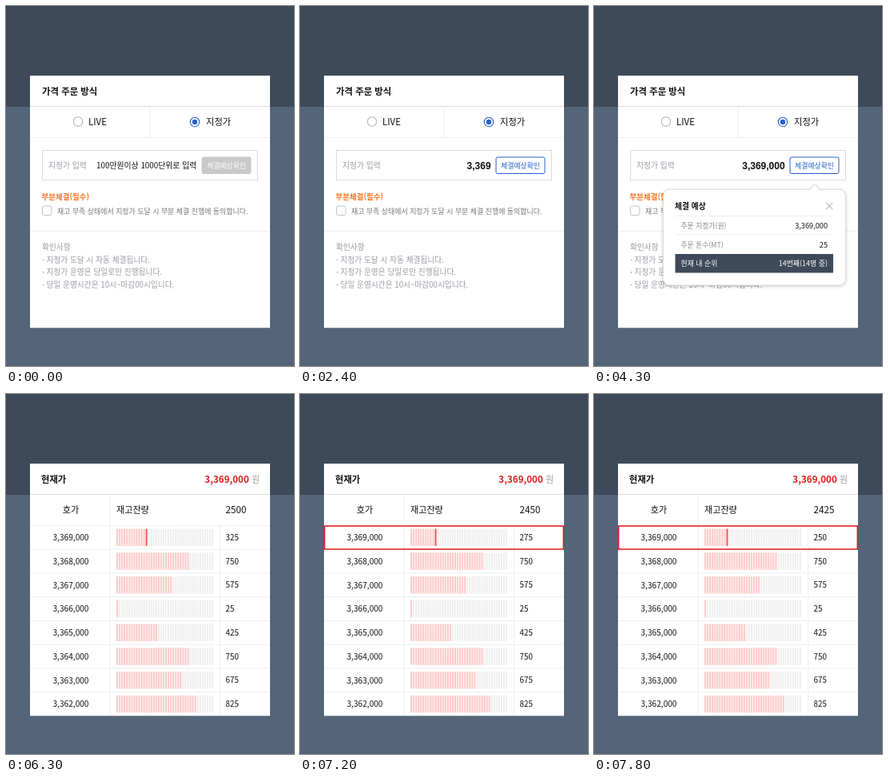
Write an HTML page that moves like this. It is 360 by 450 pixels and loops after 8 s.

```html
<!DOCTYPE html>
<html lang="ko">
<head>
<meta charset="utf-8">
<style>
  html, body { margin: 0; width: 100%; height: 100%; overflow: hidden; background: #546579; }
  svg { display: block; width: 100vw; height: 100vh; }
  text { font-family: "Noto Sans CJK KR", "Noto Sans CJK", sans-serif; white-space: pre; }
  .arial { font-family: "Liberation Sans", Arial, sans-serif; }
  .popup { filter: drop-shadow(0 1px 2px rgba(0, 0, 0, .22)); }
</style>
</head>
<body>
<svg id="stage" viewBox="0 0 360 450"></svg>
<script>
const LOOP = 8000, TYPE_START = 1500, TYPE_STEP = 300;
const POPUP_START = 4300, TABLE_START = 6300, BLINK = 300;
const NAVY = '#3e4a5a', BLUE = '#2460cc', RED = '#e01a1a', GRAY = '#9a9aa6', RULE = '#eeeeee';
const stage = document.getElementById('stage');

// Text is placed by the vertical centre of its glyphs.
function label(x, middle, string, size, { fill = '#111', weight = 400, anchor = 'start', cls = '' } = {}) {
  return `<text class="${cls}" x="${x}" y="${middle + size * 0.37}" font-size="${size}" fill="${fill}"
    font-weight="${weight}" text-anchor="${anchor}">${string}</text>`;
}
const rect = (x, y, w, h, fill, extra = '') =>
  `<rect x="${x}" y="${y}" width="${w}" height="${h}" fill="${fill}" ${extra}/>`;
const hLine = (y, x = 30, w = 300, color = RULE) => rect(x, y, w, 1, color);
const vLine = (x, y, h, color = RULE) => rect(x, y, 1, h, color);
const ring = (x, y, color) =>
  `<circle cx="${x}" cy="${y}" r="5.7" fill="#fff" stroke="${color}" stroke-width="1.1"/>`;

const card = rect(0, 0, 360, 450, '#546579') + rect(0, 0, 360, 126, NAVY) +
  rect(30, 87, 300, 315.3, '#fff') + hLine(125, 30, 300, '#dddddd') + hLine(164);

function priceButton(active) {
  const style = active ? `rx="2" stroke="${BLUE}"` : 'rx="2" stroke="#c9c9c9"';
  return rect(245, 189, 61, 20.5, active ? '#fff' : '#c9c9c9', style) +
    label(275.6, 199.5, '체결예상확인', 8.8, { fill: active ? BLUE : '#fff', anchor: 'middle' });
}

function form(t) {
  const typed = '3369000'.slice(0, Math.max(0, Math.floor((t - TYPE_START) / TYPE_STEP) + 1));
  const price = typed && Number(typed).toLocaleString('en-US');
  const notes = ['지정가 도달 시 자동 체결됩니다.', '지정가 운영은 당일로만 진행됩니다.', '당일 운영시간은 10시~마감00시입니다.'];
  return label(45, 106.5, '가격 주문 방식', 11.4, { weight: 700 }) +
    vLine(179.5, 126, 38) +
    ring(90, 144.5, '#b4b4b4') + label(103, 145, 'LIVE', 11.5, { weight: 500 }) +
    ring(236, 145, BLUE) + `<circle cx="236" cy="145" r="3.2" fill="${BLUE}"/>` +
    label(250, 145, '지정가', 11.3, { weight: 500 }) +
    rect(45.5, 180.5, 269, 37, '#fff', 'stroke="#dcdcdc"') +
    label(53, 199.5, '지정가 입력', 9.8, { fill: GRAY }) +
    (price
      ? label(238.6, 199.7, price, 12, { weight: 700, anchor: 'end', cls: 'arial' })
      : label(238.3, 199.5, '100만원이상 1000단위로 입력', 9.85, { anchor: 'end' })) +
    priceButton(Boolean(price)) +
    label(44.5, 238, '부분체결(필수)', 9.5, { fill: '#ff7420', weight: 700 }) +
    rect(45.5, 250, 11.5, 11.5, '#fff', 'rx="2" stroke="#c4c4c4"') +
    label(64, 256.3, '재고 부족 상태에서 지정가 도달 시 부분 체결 진행에 동의합니다.', 8.93, { fill: '#75757c' }) +
    hLine(281) +
    label(45, 301.5, '확인사항', 9.7, { fill: GRAY, weight: 500 }) +
    notes.map((note, i) => {
      const y = 317.3 + i * 15.6;
      return `<circle cx="46.7" cy="${y}" r="0.8" fill="${GRAY}"/>` + label(50.5, y, note, 9.7, { fill: GRAY });
    }).join('');
}

function popup() {
  const end = { anchor: 'end' };
  return `<path class="popup" fill="#fff" stroke="#d4d4d4" stroke-width=".7" d="M94 229.5H270.5L276 222.5L281.5 229.5
      H306.500a8 8 0 0 1 8 8V341a8 8 0 0 1-8 8H94.500a8 8 0 0 1-8-8V237.500a8 8 0 0 1 8-8Z"/>` +
    label(101, 250, '체결 예상', 9.75, { weight: 700 }) +
    '<path d="M290.300 246l8 8m0-8l-8 8" stroke="#999" stroke-width="1"/>' +
    hLine(262, 101.5, 197.5) + hLine(285.3, 101.5, 197.5) +
    label(108.5, 275, '주문 지정가(원)', 8.8, { fill: '#8a8a90' }) + label(292, 275, '3,369,000', 9.2, end) +
    label(108.5, 298.3, '주문 톤수(MT)', 8.8, { fill: '#8a8a90' }) +
    label(292, 298.3, '25', 9.2, { ...end, weight: 500 }) +
    rect(101.5, 310, 197.5, 23.5, NAVY) +
    label(108.5, 321.5, '현재 내 순위', 8.9, { fill: '#fff' }) +
    label(292, 321.5, '14번째(14명 중)', 8.95, { ...end, fill: '#fff' });
}

function gauge(y, filled, highlightLast) {
  let bars = '';
  for (let i = 0; i < 40; i++) {
    const color = i >= filled ? '#efefef' : highlightLast && i === filled - 1 ? '#f45b5b' : '#ffcaca';
    bars += rect(138 + i * 3.05, y, 2.1, 21.5, color);
  }
  return bars;
}

function table(t) {
  const blink = Math.floor((t - TABLE_START) / BLINK);
  const sold = 25 * Math.ceil(blink / 2);
  const stocks = [325 - sold, 750, 575, 25, 425, 750, 675, 825];
  const rows = stocks.map((stock, i) => {
    const top = 164.5 + i * 29.75, middle = top + 14.8;
    return (i ? hLine(top - 0.5) : '') +
      label(81, middle, (3369 - i).toLocaleString('en-US') + ',000', 10.15, { anchor: 'middle' }) +
      gauge(top + 4, stock / 25, i === 0) +
      label(274.5, middle, stock, 9.9);
  }).join('');
  return label(44, 106.5, '현재가', 11.3, { weight: 700 }) +
    label(303.8, 106.8, '3,369,000', 11.6, { weight: 700, fill: RED, anchor: 'end' }) +
    label(307, 106.5, '원', 11, { fill: GRAY }) +
    label(81, 145, '호가', 11.1, { weight: 500, anchor: 'middle' }) +
    label(138, 145, '재고잔량', 11.1, { weight: 500 }) +
    label(274.5, 145, 2500 - sold, 11.7, { weight: 500 }) +
    vLine(129.5, 126, 276) + vLine(267, 165, 237) + rows +
    (blink % 2 ? rect(30.7, 165, 298.6, 29, 'none', `stroke="${RED}" stroke-width="1.5"`) : '');
}

let shown = '';
function draw(now) {
  const t = now % LOOP;
  const scene = card + (t >= TABLE_START ? table(t) : form(t) + (t >= POPUP_START ? popup() : ''));
  if (scene !== shown) stage.innerHTML = shown = scene;
  requestAnimationFrame(draw);
}
draw(0);
</script>
</body>
</html>
```
